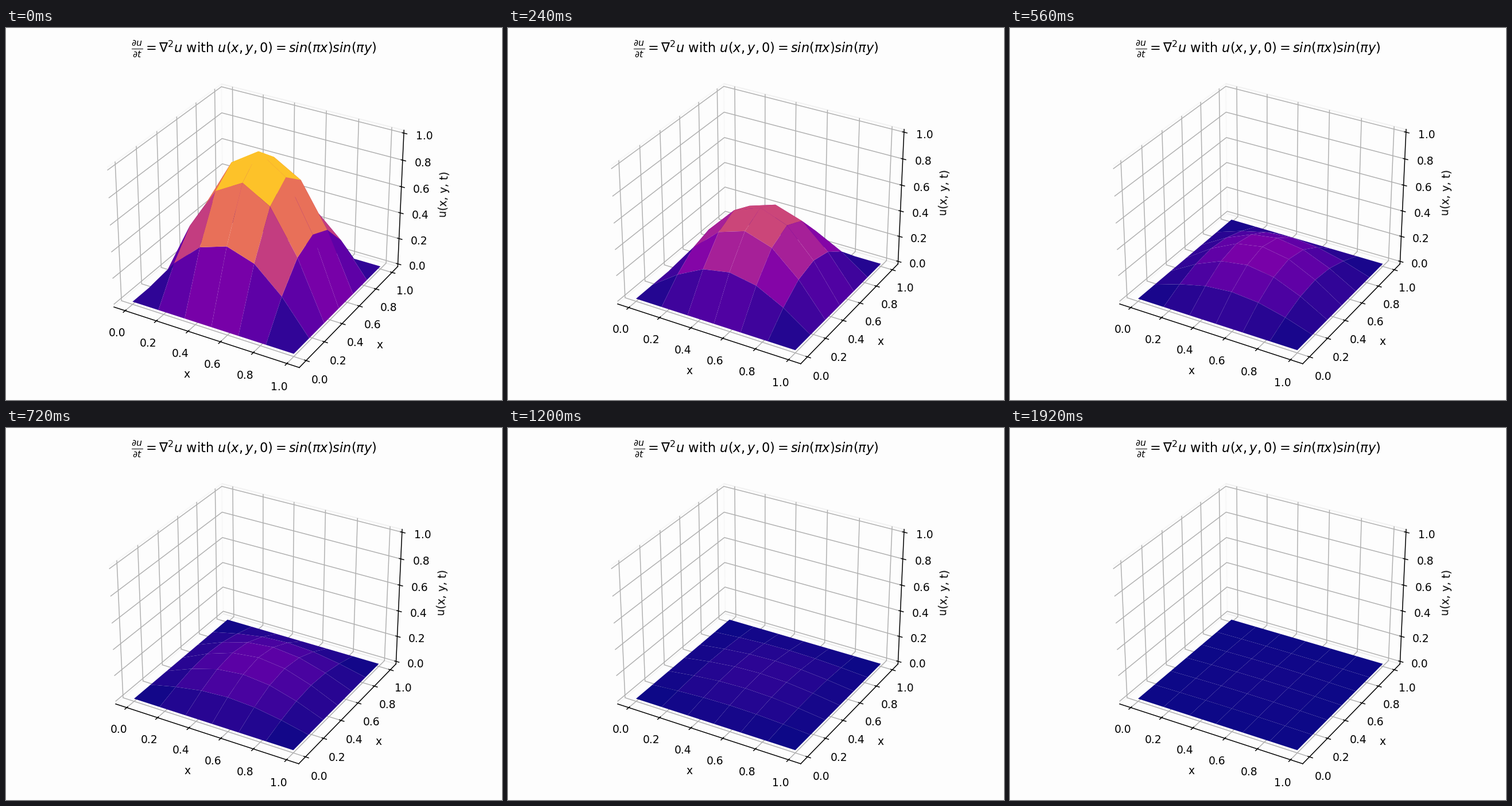
A matplotlib script for the animation above (2000 ms loop, 864 by 648 pixels).

```python
import numpy as np
import matplotlib.pyplot as plt
from matplotlib.animation import FuncAnimation

W, H, DPI = 864, 648, 135
FRAMES, INTERVAL = 25, 80
DECAY = 0.8295                  # amplitude kept per time step
TOP = 53                        # top edge of the axes, in pixels
FIRST_BOTTOM, BOTTOM = 627.75, 620.7
PAD = 1 / 48

fig = plt.figure(figsize=(W / DPI, H / DPI), dpi=DPI, facecolor="#fdfdfd")
ax = fig.add_subplot(projection="3d", facecolor="none")

x, y = np.meshgrid(np.linspace(0, 1, 7), np.linspace(0, 1, 7))
u0 = np.sin(np.pi * x) * np.sin(np.pi * y)


def place_axes(bottom):
    ax.set_position([0, 1 - bottom / H, 1, (bottom - TOP) / H])


def limits(lo, hi):
    pad = (hi - lo) * PAD
    return lo - pad, hi + pad


def draw(step):
    ax.clear()
    ax.plot_surface(x, y, u0 * DECAY**step, cmap="plasma", vmin=0, vmax=1,
                    linewidth=0.3)
    ax.set_xlim(*limits(-0.05, 1.05))
    ax.set_ylim(*limits(-0.05, 1.05))
    ax.set_zlim(*limits(0, 1))
    for axis in (ax.xaxis, ax.yaxis, ax.zaxis):
        axis.pane.fill = False
        axis.set_ticks(np.linspace(0, 1, 6))
    ax.set_xlabel("x")
    ax.set_ylabel("x")
    ax.set_zlabel("u(x, y, t)")
    ax.set_title(r"$\frac{\partial u}{\partial t} = \nabla^2 u$ with "
                 r"$u(x,y,0) = sin(\pi x)sin(\pi y)$")
    # The layout settles after the first draw.
    place_axes(BOTTOM if step else FIRST_BOTTOM)


anim = FuncAnimation(fig, draw, frames=FRAMES, interval=INTERVAL,
                     init_func=lambda: None, repeat=True, repeat_delay=0)
plt.show()
```
